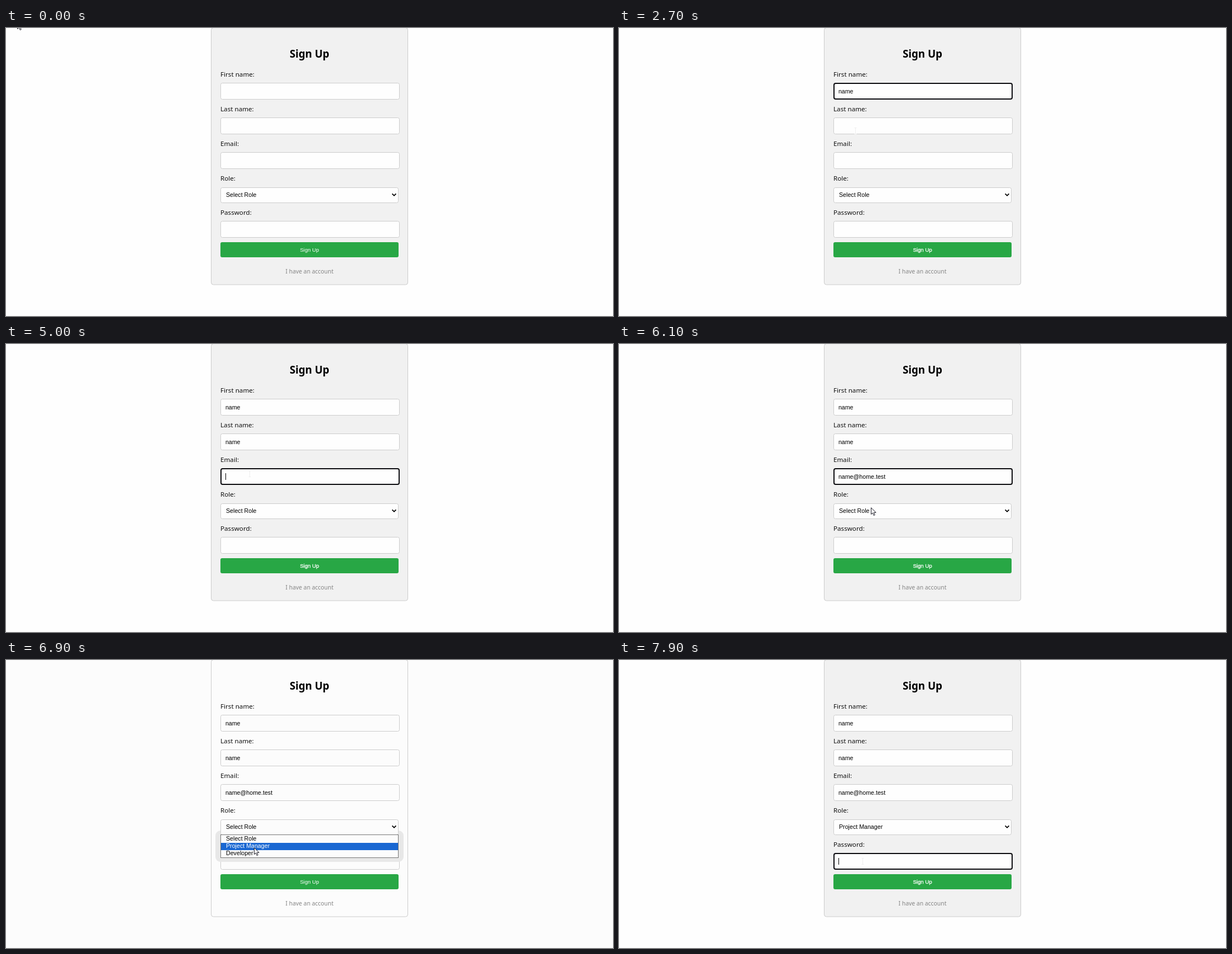
Animation, 1087 px wide and 515 px high, one loop 8000 ms. Source, as an HTML page:

```html
<!DOCTYPE html>
<html lang="en">
<head>
<meta charset="utf-8">
<title>Sign Up form</title>
<style>
  html, body { margin: 0; width: 100%; height: 100%; overflow: hidden; background: #fefefe; }
  svg { display: block; --page: #fefefe; --card: #f1f1f1; background: var(--page); }
  svg.pale { --page: #fcfcfc; --card: #fcfcfc; }
  text { font: 10.667px "Liberation Sans", Arial, sans-serif; fill: #000; white-space: pre; }
  .label, .title, .link { font-family: "Noto Sans", "Open Sans", sans-serif; }
  .label { font-size: 11.65px; fill: #111; }
  .title { font-size: 18.7px; font-weight: 700; }
  .link { font-size: 10.4px; fill: #858585; }
  .mid { text-anchor: middle; }
  .button { font-size: 9.6px; fill: #fff; }
  .heavy .button { stroke: #fff; stroke-width: .3px; }
  .card { fill: var(--card); stroke: #ccc; }
  .box { fill: var(--page); stroke: #ccc; }
  .ring { fill: none; stroke: #0c0c10; stroke-width: 2; }
  .beam { fill: none; stroke: #eee; }
</style>
</head>
<body>
<svg id="stage" width="1087" height="515" viewBox="0 0 1087 515">
  <rect class="card" x="367.5" y="-.5" width="352" height="459.5" rx="4"/>
  <text class="title mid" x="543.5" y="53">Sign Up</text>
  <g id="fields"></g>
  <rect id="shadow" x="375" y="305" width="337" height="56" rx="9" fill="#e8e8e8"/>
  <text class="label" x="384" y="273">Role:</text>
  <rect class="box" x="384.5" y="285.5" width="318" height="27" rx="3"/>
  <path d="M691.6 296.4l3.4 3.4 3.4-3.4" fill="none" stroke="#000" stroke-width="1.8"/>
  <text id="role" x="394" y="302"></text>
  <rect x="384" y="383" width="319" height="27" rx="3" fill="#28a745"/>
  <text class="button mid" x="543.5" y="400">Sign Up</text>
  <text class="link mid" x="543.5" y="439">I have an account</text>
  <rect id="ring" class="ring" x="385" width="319" height="28" rx="3"/>
  <g id="menu">
    <rect x="384.5" y="312.5" width="318" height="41" fill="#fcfcfc" stroke="#767676"/>
    <rect id="mark" x="385" width="317" height="13" fill="#1967d2"/>
  </g>
  <rect id="caret" width="1" height="12"/>
  <path id="beam" class="beam" d="M-1.5 .5H2.5M.5 .5V11.5M-1.5 11.5H2.5"/>
  <path id="arrow" d="M.5 .8V12.6L3.3 10 5.2 14.6 7.2 13.7 5.3 9.4H9.2Z" fill="#fff" stroke="#1b1b26" stroke-width="1"/>
</svg>
<script>
const LOOP = 8000;
const NAME = "name", MAIL = "name@home.test";
const $ = id => document.getElementById(id);

function add(parent, tag, attrs, text = "") {
  const el = document.createElementNS("http://www.w3.org/2000/svg", tag);
  for (const key in attrs) el.setAttribute(key, attrs[key]);
  el.textContent = text;
  return parent.appendChild(el);
}

const tops = { first: 98, last: 160, email: 222, password: 345, role: 285 };
const labels = { first: "First name:", last: "Last name:", email: "Email:", password: "Password:" };
const inputs = {};
for (const key in labels) {
  const y = tops[key], group = $("fields");
  add(group, "text", { class: "label", x: 384, y: y - 11 }, labels[key]);
  add(group, "rect", { class: "box", x: 384.5, y: y + .5, width: 320, height: 29, rx: 3 });
  inputs[key] = add(group, "text", { x: 392.9, y: y + 19 });
}

const roles = ["Select Role", "Project Manager", "Developer"];
const options = roles.map((name, i) => add($("menu"), "text", { x: 394, y: 323 + i * 13.2 }, name));

// Step tracks: [start in ms, value]
const typed = {
  first: [[0, 0], [1300, 1], [1400, 2], [1700, 3], [1900, 4]],
  last: [[0, 0], [3200, 1], [3500, 2], [3700, 3], [3900, 4]],
  email: [[0, 0], [5500, MAIL.length]],
  password: [[0, 0]]
};
const words = { first: NAME, last: NAME, email: MAIL, password: "" };
const focus = [[0, ""], [700, "first"], [2800, "last"], [4900, "email"], [6300, ""], [7500, "role"], [7900, "password"]];
const arrow = [[0, [20, -11]], [200, [248, 58]], [300, null],
  [5800, [440, 254]], [5900, [445, 272]], [6000, [449, 286]], [6100, [451, 292]],
  [6400, [450, 303]], [6600, [448, 315]], [6800, [446, 326]], [6900, [444, 335]], [7400, null]];
const beam = [[0, null], [500, [454, 116]], [2400, [438, 150]], [2500, [423, 178]],
  [4600, [430, 206]], [4700, [436, 226]], [5700, null], [7500, [436, 354]]];
const menu = [[0, 0], [6300, .3], [6400, .7], [6500, 1], [7300, .6], [7400, .3], [7500, 0]];

const entry = (track, t) => track.findLast(step => step[0] <= t);
const at = (track, t) => entry(track, t)[1];

function place(el, point) {
  el.style.display = point ? "" : "none";
  if (point) el.setAttribute("transform", `translate(${point})`);
}

function drawCaret(t, field) {
  const caret = $("caret"), track = typed[field];
  if (!track) return caret.style.display = "none";
  // Blinking restarts with every key press
  const since = t - Math.max(entry(focus, t)[0], entry(track, t)[0]);
  caret.style.display = since % 1000 < 500 ? "" : "none";
  const input = inputs[field];
  const width = input.textContent ? input.getComputedTextLength() : .2;
  caret.setAttribute("x", Math.floor(392.9 + width));
  caret.setAttribute("y", tops[field] + 9);
}

function draw(t) {
  const field = at(focus, t), pale = t >= 6300 && t < 7900;
  $("stage").classList.toggle("pale", pale);
  $("stage").classList.toggle("heavy", t >= 700 && !pale);

  for (const key in inputs) inputs[key].textContent = words[key].slice(0, at(typed[key], t));
  $("role").textContent = roles[t < 7300 ? 0 : 1];

  const ring = $("ring"), isRole = field === "role";
  ring.style.display = field ? "" : "none";
  if (field) {
    ring.setAttribute("y", tops[field] + 1);
    ring.setAttribute("width", isRole ? 317 : 319);
    ring.setAttribute("height", isRole ? 26 : 28);
  }
  drawCaret(t, field);

  const picked = t < 6800 ? 0 : 1;
  $("menu").style.opacity = $("shadow").style.opacity = at(menu, t);
  $("mark").setAttribute("y", picked ? 327 : 313.5);
  options.forEach((el, i) => el.style.fill = i === picked ? "#fff" : "#000");

  place($("arrow"), at(arrow, t));
  place($("beam"), at(beam, t));
}

let start;
function tick(now) {
  start ??= now;
  draw((now - start) % LOOP);
  requestAnimationFrame(tick);
}
draw(0);
requestAnimationFrame(tick);
</script>
</body>
</html>
```
